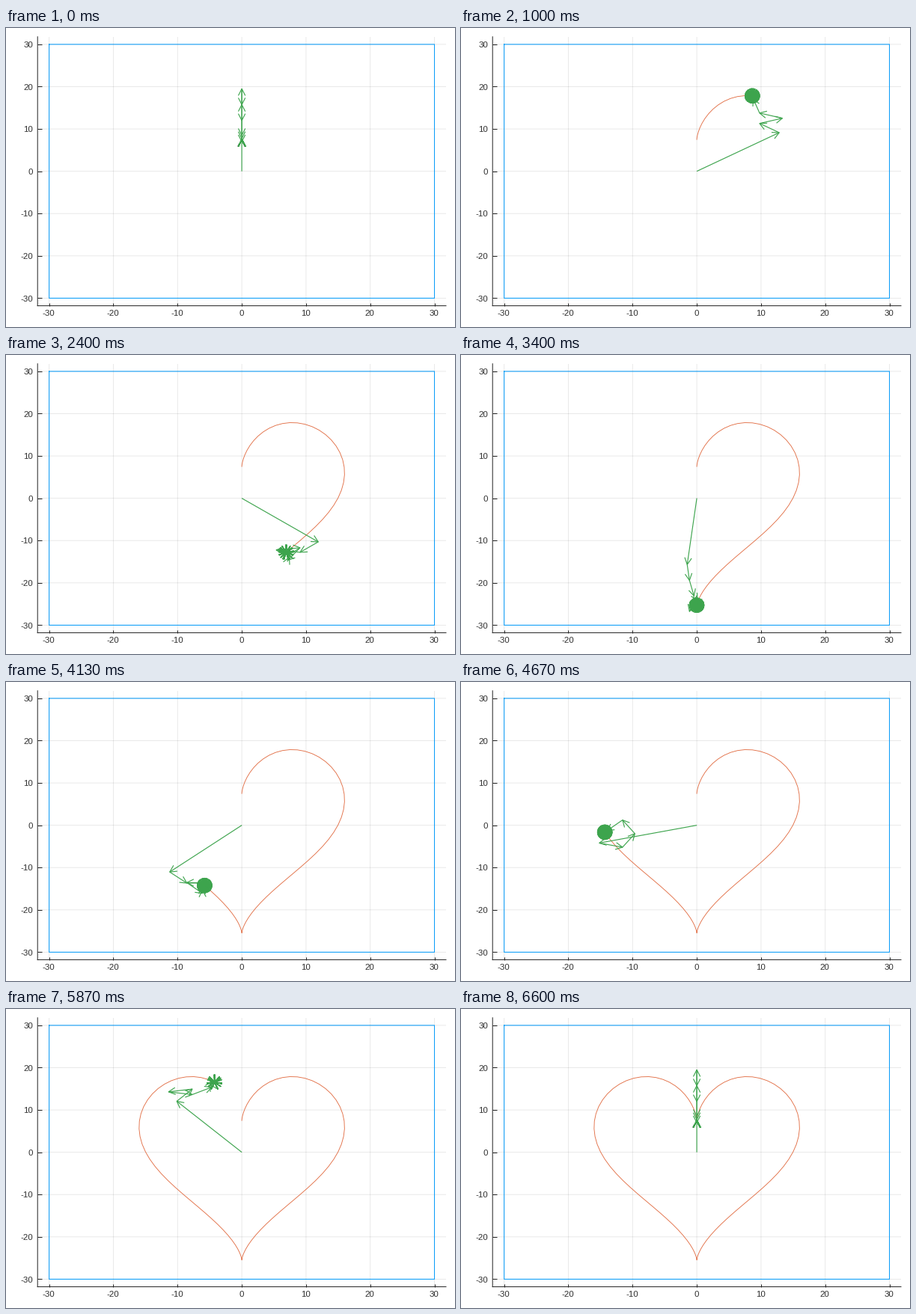
Animation of 600 by 400 pixels, one loop 6.67 s. Source, as a matplotlib script:

```python
import numpy as np
import matplotlib.pyplot as plt
from matplotlib.animation import FuncAnimation
from matplotlib.collections import LineCollection

plt.rcParams["path.snap"] = False

W, H = 600, 400
LEFT, RIGHT, TOP, BOTTOM = 42.2, 588, 11.7, 371.6
LIM = 31.8
PX = 0.72  # points per pixel at 100 dpi
POSES, SUB, LOOP = 100, 3, 6670
BLUE, ORANGE, GREEN = "#009afa", "#e26f46", "#3da44d"
SX = (RIGHT - LEFT) / (2 * LIM)
SY = (BOTTOM - TOP) / (2 * LIM)

# Heart curve as rotating vectors i * a * exp(i k t), longest first;
# the remaining harmonics are tiny but still carry a full arrowhead.
MAIN = {-1: 15.75, 1: 3.75, 2: -3.75, -2: -3.75,
        -3: -3.5, 4: -0.75, -4: -0.75, 3: 0.5}
REST = [k for k in range(-50, 51) if k not in MAIN]
FREQ = np.array(list(MAIN) + REST)
AMP = np.array(list(MAIN.values()) + [1e-5] * len(REST))
TIMES = np.linspace(0, 2 * np.pi, POSES)

HEAD = 10.2
SPREAD = np.radians(27)


def vectors(t):
    return 1j * AMP * np.exp(1j * FREQ * t)


TRACE = np.array([vectors(t).sum() for t in TIMES])


def arrows(t):
    """Shafts and open heads of the vector chain, heads sized in pixels."""
    v = vectors(t)
    tips = np.cumsum(v)
    tails = tips - v
    angle = np.arctan2(v.imag * SY, v.real * SX)

    def barb(turn):
        a = angle + np.pi + turn
        return tips + HEAD * (np.cos(a) / SX + 1j * np.sin(a) / SY)

    def lines(*points):
        z = np.stack(points, axis=1)
        return list(np.stack([z.real, z.imag], axis=-1))

    return lines(tails, tips) + lines(barb(SPREAD), tips, barb(-SPREAD))


fig = plt.figure(figsize=(6, 4), dpi=100, facecolor="white")
ax = fig.add_axes([LEFT / W, 1 - BOTTOM / H,
                   (RIGHT - LEFT) / W, (BOTTOM - TOP) / H])
ax.set(xlim=(-LIM, LIM), ylim=(-LIM, LIM))
ticks = range(-30, 31, 10)
ax.set_xticks(ticks)
ax.set_yticks(ticks)
for axis, length in (("x", 4.5), ("y", 6.3)):
    ax.tick_params(axis=axis, direction="in", length=length * PX, width=PX,
                   color="#222222", labelbottom=False, labelleft=False)
ax.grid(color="black", alpha=0.1, lw=0.85 * PX)
ax.set_axisbelow(True)
for side in ("top", "right"):
    ax.spines[side].set_visible(False)
for side in ("left", "bottom"):
    ax.spines[side].set(linewidth=PX, color="#222222")

font = dict(family="Liberation Sans", size=11.5 * PX, color="#303030")
for n in ticks:
    x = (LEFT + RIGHT) / 2 + n * SX
    y = (TOP + BOTTOM) / 2 - n * SY
    fig.text((x - 0.6) / W, 1 - 385 / H, str(n), ha="center", va="baseline", **font)
    fig.text(36 / W, 1 - (y + 4.2) / H, str(n), ha="right", va="baseline", **font)

ax.plot([-30, 30, 30, -30, -30], [30, 30, -30, -30, 30], color=BLUE, lw=PX)
trace, = ax.plot([], [], color=ORANGE, lw=0.9 * PX, zorder=3)
chain = LineCollection([], colors=GREEN, linewidths=1.15 * PX, zorder=4)
ax.add_collection(chain, autolim=False)


def update(n):
    # Each pose holds for SUB ticks and starts one tick early.
    i = min((n + 1) // SUB, POSES - 1)
    path = TRACE[:i + 1]
    trace.set_data(path.real, path.imag)
    chain.set_segments(arrows(TIMES[i]))
    return trace, chain


anim = FuncAnimation(fig, update, frames=POSES * SUB,
                     interval=LOOP / (POSES * SUB),
                     repeat=True, repeat_delay=0)
plt.show()
```
